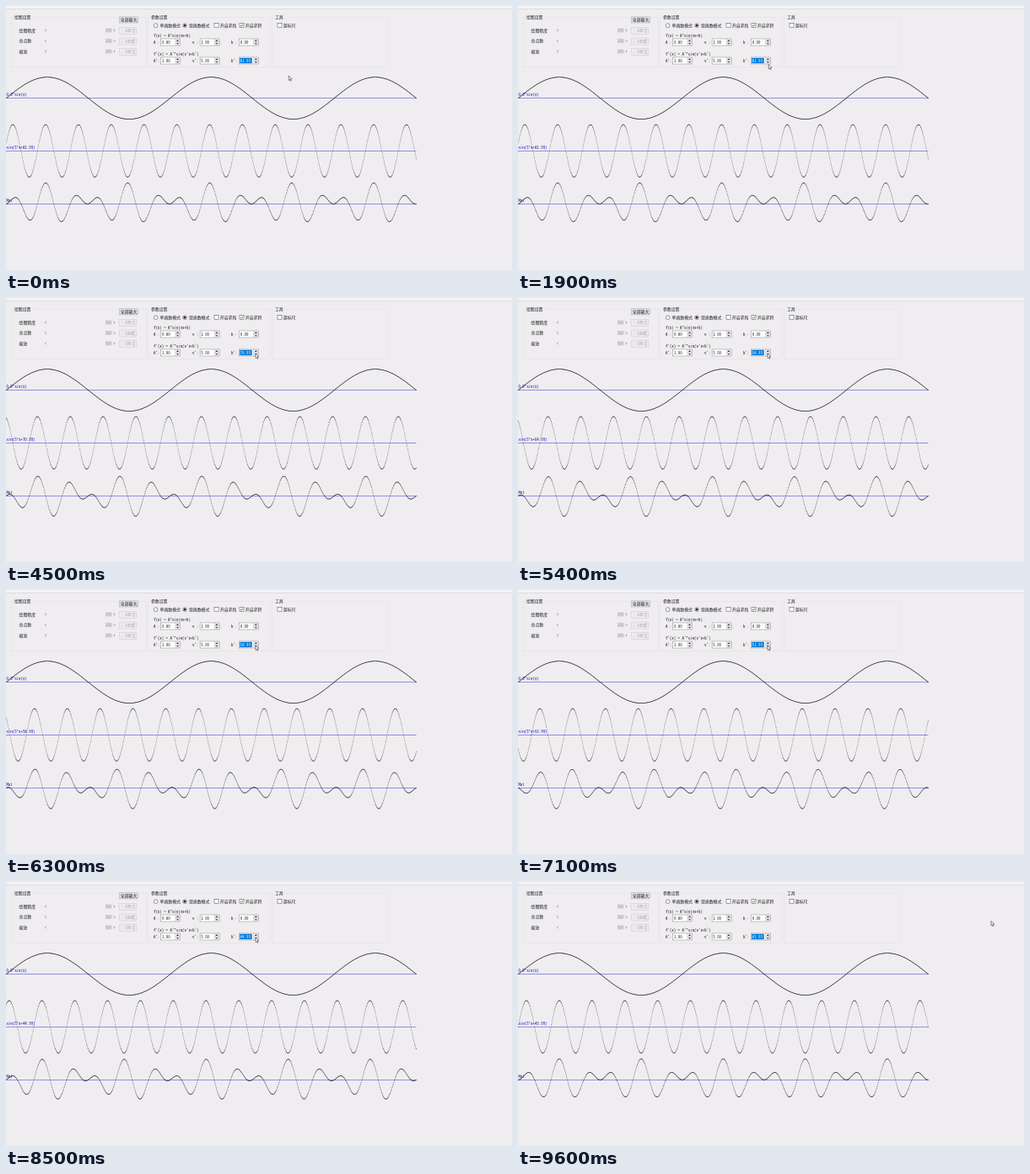
Animation, 600 px wide and 314 px high, one loop 9700 ms. Source, as an HTML page with a canvas:

```html
<!DOCTYPE html>
<html lang="zh">
<head>
<meta charset="utf-8">
<style>
  html, body { margin: 0; width: 100%; height: 100%; overflow: hidden; background: #efedf0; }
  canvas { display: block; }
</style>
</head>
<body>
<canvas id="stage" width="600" height="314"></canvas>
<script>
const ctx = document.getElementById('stage').getContext('2d');
const LOOP = 9700;
const CJK = '4.88px "Noto Sans CJK SC", "Noto Sans CJK", sans-serif';
const MONO = '4.88px "Noto Sans Mono CJK SC", "Noto Sans CJK SC", monospace';
const INK = '#1c1c1c', GREY = '#a3a1a4', AXIS = '#2020d8';
const LEFT = 0.3, RIGHT = 486.5, UNIT = 31.2, POINTS = 1000, SPAN = 5 * Math.PI, DOT = 0.65;

// Spin button: one click, then auto-repeat while held
const CLICK = 2494, REPEAT = 2994, PERIOD = 156, MAX_STEPS = 38;

// Pointer path: time, x, y
const PATH = [
  [0, 335.3, 83], [300, 335.3, 83], [1100, 297.2, 69.5], [2000, 297.2, 69.5],
  [2300, 296, 66], [8700, 296, 66], [9200, 578, 56], [9550, 561, 46.4], [LOOP, 561, 46.4]
];

function box(x, y, w, h, fill, stroke) {
  if (fill) { ctx.fillStyle = fill; ctx.fillRect(x, y, w, h); }
  if (stroke) {
    ctx.strokeStyle = stroke;
    ctx.lineWidth = 0.5;
    ctx.strokeRect(x, y, w, h);
  }
}

function text(s, x, y, color = INK, font = MONO) {
  ctx.font = font;
  ctx.fillStyle = color;
  ctx.fillText(s, x, y + 1.8);
}

const label = (s, x, y) => text(s, x, y, INK, CJK);

function line(points, color, width = 0.6) {
  ctx.strokeStyle = color;
  ctx.lineWidth = width;
  ctx.beginPath();
  points.forEach(([x, y]) => ctx.lineTo(x, y));
  ctx.stroke();
}

function triangle(x, y, dir, color) {
  ctx.fillStyle = color;
  ctx.beginPath();
  ctx.moveTo(x - 1.3, y + dir * 0.7);
  ctx.lineTo(x + 1.3, y + dir * 0.7);
  ctx.lineTo(x, y - dir * 0.9);
  ctx.fill();
}

function group(x, w, title) {
  box(x + 0.5, 13.5, w, 59, null, '#dfdde0');
  ctx.font = CJK;
  box(x + 3, 10, ctx.measureText(title).width + 2, 7, '#efedf0');
  label(title, x + 4, 13.3);
}

function spin(x, y, value, selected) {
  box(x + 0.3, y - 4, 23, 8, '#fff', '#8a888b');
  if (selected) box(x + 1, y - 3.2, 14.5, 6.4, '#0078d7');
  text(value, x + 1.5, y, selected ? '#fff' : INK);
  box(x + 17.5, y - 3.6, 5.2, 3.4, '#e9e7ea', '#c4c2c5');
  box(x + 17.5, y + 0.2, 5.2, 3.4, '#e9e7ea', '#c4c2c5');
  triangle(x + 20.1, y - 1.8, 1, '#222');
  triangle(x + 20.1, y + 1.9, -1, '#222');
}

function slider(name, y, value) {
  label(name, 15.6, y);
  line([[47.6, y - 1.2], [46.4, y], [47.6, y + 1.2]], '#555');
  line([[127.8, y - 1.3], [129, y], [127.8, y + 1.3]], '#555');
  box(118, y - 2.4, 7.5, 4.8, '#cbc9cc');
  box(134.8, y - 3.5, 19.6, 8, '#ebe9ec', '#c9c7ca');
  text(value, 141.5, y + 0.5, GREY);
  triangle(151.6, y - 1.2, 1, GREY);
  triangle(151.6, y + 2.1, -1, GREY);
}

function radio(x, name, on) {
  ctx.beginPath();
  ctx.arc(x, 23.2, 2.4, 0, 7);
  ctx.fillStyle = '#fff';
  ctx.fill();
  ctx.strokeStyle = '#333';
  ctx.lineWidth = 0.5;
  ctx.stroke();
  if (on) {
    ctx.beginPath();
    ctx.arc(x, 23.2, 1.4, 0, 7);
    ctx.fillStyle = '#222';
    ctx.fill();
  }
  label(name, x + 5, 23);
}

function check(x, name, on) {
  box(x, 20.6, 5, 5, '#fff', '#444');
  if (on) line([[x + 1, 23.1], [x + 2.1, 24.3], [x + 4.2, 21.7]], '#222');
  label(name, x + 6.8, 23);
}

function panel(b) {
  box(0, 0, 600, 3, '#f5f3f6');
  box(0, 3, 600, 0.8, '#d9d7da');

  group(6, 160, '绘图设置');
  box(134.3, 12.8, 22.4, 7.2, '#e1dfe2', '#adabae');
  label('全部最大', 135.8, 16.4);
  slider('绘图精度', 29, '100');
  slider('总点数', 41.5, '1000');
  slider('缩放', 54, '100');

  group(168, 144, '参数设置');
  radio(177.6, '单函数模式', false);
  radio(212, '双函数模式', true);
  check(247, '开启求和', false);
  check(277, '开启求积', true);
  text('f(x) = A*sin(vx+b)', 175, 35);
  text("f'(x) = A'*sin(v'x+b')", 175, 57.3);
  const rows = [[43, ' :', ['0.80', '1.00', '0.00']], [65, "':", ['1.00', '5.00', b]]];
  for (const [y, mark, values] of rows) {
    values.forEach((v, i) => {
      text('Avb'[i] + mark, 175 + 46 * i, y);
      spin(183.4 + 46.4 * i, y, v, v === b);
    });
  }

  group(315, 138, '工具');
  check(322, '游标尺', false);
}

function plot(y0, name, fn) {
  box(0, y0 - 0.23, RIGHT, 0.46, AXIS);
  ctx.fillStyle = '#000';
  for (let i = 0; i <= POINTS; i++) {
    const k = i / POINTS;
    const x = LEFT + k * (RIGHT - LEFT), y = y0 - UNIT * fn(k * SPAN);
    ctx.fillRect(x - DOT / 2, y - DOT / 2, DOT, DOT);
  }
  text(name, 0.4, y0 - 4.5, '#1010a8');
}

function pointer(t) {
  const i = PATH.findIndex(p => p[0] > t);
  const [t0, x0, y0] = PATH[i - 1], [t1, x1, y1] = PATH[i];
  const k = (t - t0) / (t1 - t0), e = k * k * (3 - 2 * k);
  ctx.save();
  ctx.translate(x0 + (x1 - x0) * e, y0 + (y1 - y0) * e);
  ctx.beginPath();
  ctx.moveTo(0, 0);
  for (const [x, y] of [[0, 5.4], [1.2, 4.3], [2.1, 6.2], [2.9, 5.8], [2.1, 4], [3.8, 3.8]]) ctx.lineTo(x, y);
  ctx.closePath();
  ctx.fillStyle = '#fff';
  ctx.fill();
  ctx.strokeStyle = '#333';
  ctx.lineWidth = 0.6;
  ctx.stroke();
  ctx.restore();
}

function steps(t) {
  if (t < CLICK) return 0;
  if (t < REPEAT) return 1;
  return Math.min(MAX_STEPS, 2 + Math.floor((t - REPEAT) / PERIOD));
}

function draw(t) {
  const b = 81.99 - steps(t), shown = b.toFixed(2);
  const f = x => 0.8 * Math.sin(x);
  const g = x => Math.sin(5 * x + b);
  box(0, 0, 600, 314, '#efedf0');
  panel(shown);
  plot(109.6, '0.8*sin(x)', f);
  plot(172.3, `sin(5*x+${shown})`, g);
  plot(235.3, 'Mul', x => f(x) * g(x));
  pointer(t);
}

const start = performance.now();
function tick() {
  draw((performance.now() - start) % LOOP);
  requestAnimationFrame(tick);
}
tick();
</script>
</body>
</html>
```
